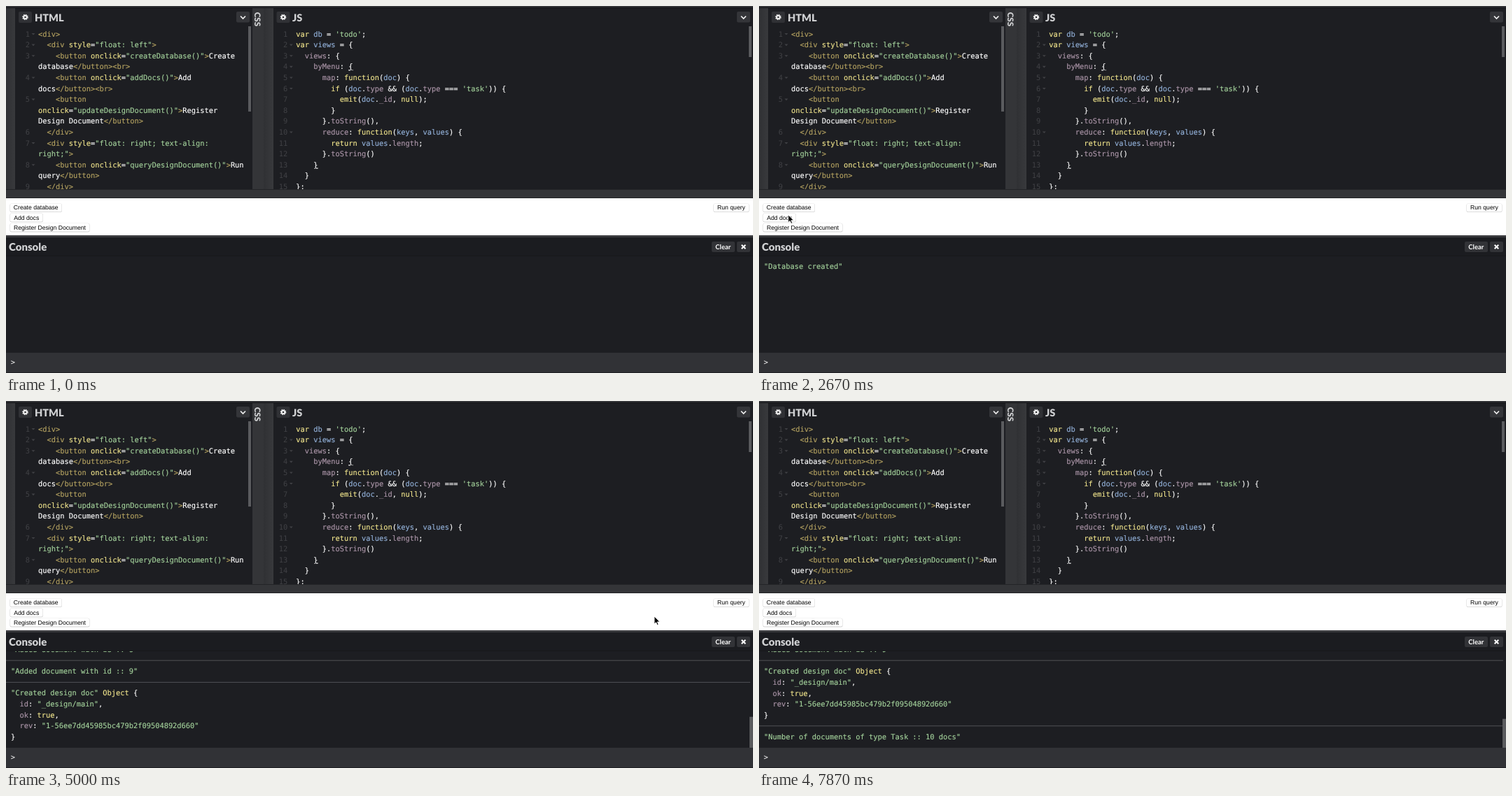
These frames come from a looping animation (1067x525 px, 7940 ms). An HTML page:

```html
<!DOCTYPE html>
<html lang="en">
<head>
<meta charset="utf-8">
<title>Code editor demo</title>
<style>
  html, body { margin: 0; width: 100%; height: 100%; overflow: hidden; background: #1d1e22; }
  svg { display: block; width: 1067px; height: 525px; }
  text { white-space: pre; text-rendering: geometricPrecision; }
  .code { font: 10.39px "DejaVu Sans Mono", "Noto Sans Mono", monospace; font-variant-ligatures: none; }
  .title { font: 900 14.5px Lato, sans-serif; fill: #d0d1d3; }
  .console { font-size: 15px; }
  .css { font-size: 11.6px; }
  .small { font: 700 9.5px Lato, sans-serif; fill: #fff; }
  .button { font: 8.64px "Liberation Sans", Arial, sans-serif; fill: #000; }
</style>
</head>
<body>
<svg id="stage" viewBox="0 0 1067 525" xmlns="http://www.w3.org/2000/svg">
  <defs>
    <clipPath id="editorClip"><rect y="29" width="1067" height="233"/></clipPath>
    <clipPath id="consoleClip"><rect y="358" width="1067" height="138"/></clipPath>
    <linearGradient id="bar"><stop stop-color="#303134"/><stop offset="1" stop-color="#38393c"/></linearGradient>
    <g id="gear" fill="none" stroke="#f0f0f0">
      <rect x="-9.5" y="-8" width="19" height="16" rx="2" fill="#303135" stroke="none"/>
      <circle r="2.3" stroke-width="2"/>
      <circle r="3.6" stroke-width="1.4" stroke-dasharray="1.5 1.327"/>
    </g>
    <g id="chevron">
      <rect x="-9.5" y="-8" width="19" height="15.5" rx="2" fill="#343539"/>
      <path d="M-3.5-1.5L0 2L3.5-1.5" fill="none" stroke="#f0f0f0" stroke-width="1.7"/>
    </g>
  </defs>

  <rect width="1067" height="525" fill="#1d1e22"/>
  <rect width="1067" height="2" fill="#343538"/>
  <rect y="2" width="1067" height="1" fill="#111215"/>
  <rect y="3" width="13" height="259" fill="url(#bar)"/>
  <rect x="352" y="3" width="16" height="259" fill="#343538"/>
  <rect x="368" y="3" width="14" height="259" fill="url(#bar)"/>

  <use href="#gear" x="27.5" y="16"/>
  <text class="title" x="41" y="21.5">HTML</text>
  <use href="#chevron" x="338.5" y="16"/>
  <text class="title css" transform="translate(354.7 8.7) rotate(90)">CSS</text>
  <use href="#gear" x="396" y="16"/>
  <text class="title" x="409" y="21.5">JS</text>
  <use href="#chevron" x="1053.5" y="16"/>

  <g id="editors" class="code" clip-path="url(#editorClip)"></g>
  <rect x="346" y="29" width="4" height="122" fill="#5a5b5e"/>
  <rect x="1061" y="29" width="4" height="44" fill="#5a5b5e"/>

  <rect y="262" width="1067" height="13" fill="#343538"/>
  <rect y="262" width="1067" height="1" fill="#232427"/>
  <rect y="274" width="1067" height="1" fill="#232427"/>
  <rect y="275" width="1067" height="53" fill="#fff"/>
  <g id="buttons"></g>

  <rect y="328" width="1067" height="3" fill="#3a3b3e"/>
  <rect y="331" width="1067" height="26" fill="#1b1c20"/>
  <rect y="357" width="1067" height="1" fill="#17181b"/>
  <text class="title console" x="4" y="350.3">Console</text>
  <rect x="1008" y="337" width="33" height="15" rx="2" fill="#323337"/>
  <text class="small" x="1013.3" y="347.5">Clear</text>
  <rect x="1044" y="337" width="19" height="15" rx="2" fill="#323337"/>
  <path d="M1050.7 341.7l5.6 5.6m0-5.6l-5.6 5.6" stroke="#fff" stroke-width="2"/>

  <g clip-path="url(#consoleClip)"><g id="log" class="code"></g></g>
  <rect id="thumb" x="1062" width="5" fill="#5a5b5e"/>
  <rect y="496" width="1067" height="29" fill="#313236"/>
  <rect y="524" width="1067" height="1" fill="#1f2023"/>
  <text class="code" x="6.7" y="513" fill="#fff" font-weight="700">&gt;</text>

  <path id="cursor" d="M0 0V11L2.5 8.7L4.3 12.6L6.1 11.8L4.4 8H7.9Z" fill="#000" stroke="#fff" stroke-width=".9"/>
</svg>
<script>
const LOOP = 7940, LINE = 15.6, LOG_TOP = 357, LOG_BOTTOM = 496;
const COLORS = {
  w: '#fff', t: '#b3a160', k: '#f0e48c', s: '#a2d09a', v: '#92b0d8', p: '#ab95a8', u: '#fff'
};
const $ = id => document.getElementById(id);

function add(parent, name, attrs, content = '') {
  const node = document.createElementNS('http://www.w3.org/2000/svg', name);
  for (const key in attrs) node.setAttribute(key, attrs[key]);
  node.textContent = content;
  return parent.appendChild(node);
}

// "^x" switches the colour; "^u" also underlines.
function codeLine(parent, x, y, source) {
  const text = add(parent, 'text', { x, y });
  for (const part of source.split('^')) {
    if (!part) continue;
    const color = COLORS[part[0]];
    const attrs = { fill: color, stroke: color, 'stroke-width': .15 };
    if (part[0] === 'u') attrs['text-decoration'] = 'underline';
    add(text, 'tspan', attrs, part.slice(1));
  }
}

// A leading "+" gives the line a fold arrow, "-" a number only, "." neither.
function editor(x, lines) {
  let number = 0;
  lines.forEach((line, i) => {
    const y = 43.5 + i * LINE;
    if (line[0] !== '.') {
      add($('editors'), 'text', { x: x - 12, y, 'text-anchor': 'end', fill: '#404145' }, ++number);
    }
    if (line[0] === '+') {
      add($('editors'), 'path', { d: `M${x - 9.5} ${y - 4.5}h5l-2.5 2.6z`, fill: '#404145' });
    }
    codeLine($('editors'), x, y, line.slice(1));
  });
}

const button = (call, label) => `^t    <button ^konclick^w=^s"${call}()"^t>^w${label}`;
editor(46, [
  '+^t<div>',
  '+^t  <div ^kstyle^w=^s"float: left"^t>',
  '+' + button('createDatabase', 'Create'),
  '.^wdatabase^t</button><br>',
  '+' + button('addDocs', 'Add'),
  '.^wdocs^t</button><br>',
  '+^t    <button',
  '.^konclick^w=^s"updateDesignDocument()"^t>^wRegister',
  '.^wDesign Document^t</button>',
  '-^t  </div>',
  '+^t  <div ^kstyle^w=^s"float: right; text-align:',
  '.^sright;"^t>',
  '+' + button('queryDesignDocument', 'Run'),
  '.^wquery^t</button>',
  '-^t  </div>'
]);
editor(414.3, [
  "-^kvar ^vdb ^w= ^s'todo'^w;",
  '+^kvar ^vviews ^w= {',
  '+^p  views^w: {',
  '+^p    byMenu^w: ^u{',
  '+^p      map^w: ^kfunction^w(^vdoc^w) {',
  "+^k        if ^w(^vdoc^w.^ptype ^w&& (^vdoc^w.^ptype ^w=== ^s'task'^w)) {",
  '-^k          emit^w(^vdoc^w.^p_id^w, ^knull^w);',
  '-^w        }',
  '-^w      }.^ptoString^w(),',
  '+^p      reduce^w: ^kfunction^w(^vkeys^w, ^vvalues^w) {',
  '-^k        return ^vvalues^w.^plength^w;',
  '-^w      }.^ptoString^w()',
  '-^w    ^u}',
  '-^w  }',
  '-^w};'
]);

function pageButton(x, y, width, label) {
  add($('buttons'), 'rect', { x, y: y + .4, width, height: 12.6, rx: 2.5, fill: '#d2d2d2' });
  add($('buttons'), 'rect', { x: x + .5, y: y + .5, width: width - 1, height: 11.7, rx: 2, fill: '#fff' });
  add($('buttons'), 'text', { class: 'button', x: x + width / 2, y: y + 9.4, 'text-anchor': 'middle' }, label);
}
pageButton(5.5, 282, 74.5, 'Create database');
pageButton(5.5, 296.2, 47.5, 'Add docs');
pageButton(5.5, 310.4, 114, 'Register Design Document');
pageButton(1010.5, 282, 51, 'Run query');

const entries = [
  { at: 1670, lines: ['^s"Database created"'] },
  ...Array.from({ length: 10 }, (_, id) => ({
    at: 2880 + id * 12, lines: [`^s"Added document with id :: ${id}"`]
  })),
  { at: 3730, lines: [
    '^s"Created design doc" ^kObject ^w{',
    '^p  id^w: ^s"_design/main"^w,',
    '^p  ok^w: ^ktrue^w,',
    '^p  rev^w: ^s"1-56ee7dd45985bc479b2f09504892d660"',
    '^w}'
  ] },
  { at: 6030, lines: ['^s"Number of documents of type Task :: 10 docs"'] }
];
let total = 0;
for (const entry of entries) {
  entry.group = add($('log'), 'g', {});
  const top = LOG_TOP + total;
  if (total) add(entry.group, 'path', { d: `M0 ${top}H1063`, stroke: '#505155' });
  entry.lines.forEach((line, i) => codeLine(entry.group, 7, top + (i + 1) * LINE + 3.5, line));
  total += (entry.lines.length + 1) * LINE;
  entry.bottom = total;
}

// Pointer stops: time, x, y.
const stops = [
  [200, 330, 492], [800, 110, 335], [1300, 50, 289], [2450, 50, 289], [2800, 38, 303],
  [3350, 38, 303], [3600, 46, 317], [4050, 46, 317], [4790, 915, 311], [5000, 926, 308],
  [5500, 1036, 287], [6330, 1036, 287], [6730, 698, 444], [7270, 600, 527]
];

function pointer(time) {
  const i = stops.findIndex(stop => stop[0] > time);
  if (i < 1) return null;
  const [t0, x0, y0] = stops[i - 1], [t1, x1, y1] = stops[i];
  const p = (time - t0) / (t1 - t0), ease = p * p * (3 - 2 * p);
  return [x0 + (x1 - x0) * ease, y0 + (y1 - y0) * ease];
}

function draw(time) {
  let height = 0;
  for (const entry of entries) {
    const shown = time >= entry.at;
    entry.group.setAttribute('visibility', shown ? 'visible' : 'hidden');
    if (shown) height = entry.bottom;
  }
  const view = LOG_BOTTOM - LOG_TOP, scroll = Math.max(0, height - view);
  const size = scroll ? view * view / height : 0;
  $('log').setAttribute('transform', `translate(0 ${-scroll})`);
  $('thumb').setAttribute('height', size);
  $('thumb').setAttribute('y', LOG_BOTTOM - size);

  const position = pointer(time);
  $('cursor').setAttribute('visibility', position ? 'visible' : 'hidden');
  if (position) $('cursor').setAttribute('transform', `translate(${position})`);
}

const start = performance.now();
function tick() {
  draw((performance.now() - start) % LOOP);
  requestAnimationFrame(tick);
}
tick();
</script>
</body>
</html>
```
